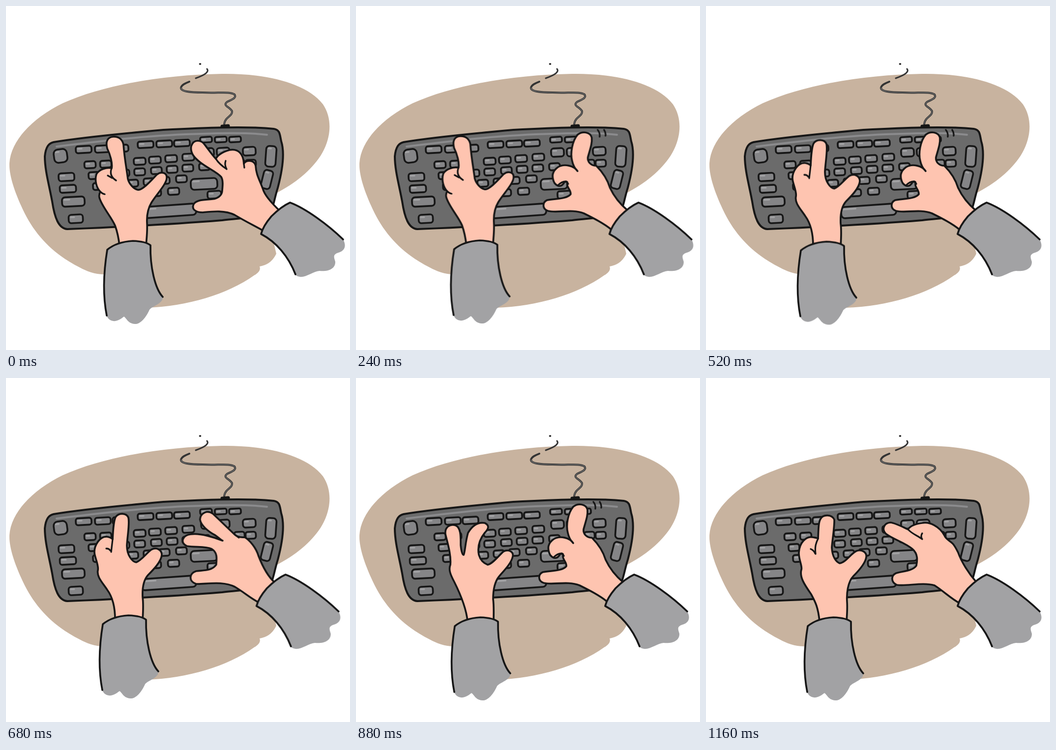
Animation, 700 px wide and 700 px high, one loop 1200 ms. Source, as an HTML page:

```html
<!DOCTYPE html>
<html lang="en">
<head>
<meta charset="utf-8">
<title>Typing hands</title>
<style>
html, body { margin: 0; width: 100%; height: 100%; overflow: hidden; background: #fff; }
svg { display: block; width: 100%; height: 100%; }

.line, .hand path { stroke: #161616; stroke-width: 3.7; stroke-linecap: round; stroke-linejoin: round; }
.line { fill: none; }
.hand path { fill: #fec4b0; }
.hand .crease { fill: none; stroke-width: 3.3; }
.sleeve { fill: #a2a2a4; }
.key { fill: #858587; stroke: #161616; stroke-width: 3.6; }
.shine { fill: none; stroke: #a3a3a5; stroke-width: 3.5; stroke-linecap: round; }

/* arms drift in 40 ms steps */
.arm { animation: 1200ms infinite; }
#left { animation-name: drift-left; }
#right { animation-name: drift-right; }
@keyframes drift-left {
  0% { transform: translate(0, 0); animation-timing-function: steps(4); }
  13.333% { transform: translate(-4px, -1px); animation-timing-function: steps(5); }
  30% { transform: translate(-10px, -1px); animation-timing-function: steps(4); }
  43.333% { transform: translate(-13px, 1.5px); animation-timing-function: steps(4); }
  56.666% { transform: translate(-9px, 5px); animation-timing-function: steps(5); }
  73.333% { transform: translate(-5px, 9px); animation-timing-function: steps(6); }
  93.333% { transform: translate(0, 11px); animation-timing-function: steps(1); }
  96.666%, 100% { transform: translate(1px, 9px); }
}
@keyframes drift-right {
  0% { transform: translate(0, 0); animation-timing-function: steps(22); }
  73.333% { transform: translate(-12px, 0); animation-timing-function: steps(6); }
  93.333% { transform: translate(-9px, 0); animation-timing-function: steps(1); }
  96.666%, 100% { transform: translate(-7px, 0); }
}

/* finger poses swap at once */
.hand { visibility: hidden; animation: 1200ms step-end infinite; }
#l-point { animation-name: l-point; }
#l-lift { animation-name: l-lift; }
#l-spread { animation-name: l-spread; }
#l-reach { animation-name: last; }
#r-point { animation-name: r-point; }
#r-lift { animation-name: r-lift; }
#r-spread { animation-name: r-spread; }
#r-reach { animation-name: last; }
@keyframes l-point { 0%, 90% { visibility: visible; } 23.333%, 96.666%, 100% { visibility: hidden; } }
@keyframes l-lift { 0%, 66.666%, 100% { visibility: hidden; } 23.333% { visibility: visible; } }
@keyframes l-spread { 0%, 90%, 100% { visibility: hidden; } 66.666% { visibility: visible; } }
@keyframes r-point { 0%, 90% { visibility: visible; } 10%, 96.666%, 100% { visibility: hidden; } }
@keyframes r-lift { 0%, 50%, 90%, 100% { visibility: hidden; } 10%, 66.666% { visibility: visible; } }
@keyframes r-spread { 0%, 66.666%, 100% { visibility: hidden; } 50% { visibility: visible; } }
@keyframes last { 0% { visibility: hidden; } 96.666%, 100% { visibility: visible; } }
</style>
</head>
<body>
<svg viewBox="0 0 700 700">
  <path fill="#c8b39f" d="M440 138C525 137 610 155 645 200C665 230 662 270 640 305C620 335 590 360 548 382L535 440L550 504Q540 526 516 530Q520 540 505 548C450 587 370 611 285 614L250 600L200 546C180 546 165 540 150 532C92 503 54 460 31 407C18 378 6 345 7 320C10 270 60 225 115 198C200 160 320 140 440 138Z"/>

  <g id="cable" fill="none" stroke-linecap="round">
    <path stroke="#333" stroke-width="4" d="M444 240C446 225 461 225 460 214C455 205 440 203 450 195C460 190 470 187 465 180C455 173 430 178 400 176C375 176 355 174 356 166C358 160 365 157 373 154"/>
    <path stroke="#777" stroke-width="1.2" d="M444 240C446 225 461 225 460 214C455 205 440 203 450 195C460 190 470 187 465 180C455 173 430 178 400 176C375 176 355 174 356 166"/>
    <path stroke="#333" stroke-width="3" d="M386 147C400 142 415 135 409 128"/>
    <path stroke="#222" stroke-width="3.6" d="M394.5 118h1"/>
    <path stroke="#161616" stroke-width="7" d="M440 245l12-1"/>
  </g>

  <path fill="#6b6b6b" stroke="#161616" stroke-width="4" d="M97 277C150 268 220 261 320 252C400 248 490 244 545 250C558 252 557 262 560 275C568 300 561 340 553 370C545 395 545 410 535 424C500 432 470 432 440 436C340 444 200 451 125 454C107 453 99 431 94 398C88 365 79 335 79 306C81 285 88 279 97 277Z"/>
  <path fill="none" stroke="#8b8b8d" stroke-width="4" stroke-linecap="round" d="M103 286C200 274 300 262 400 260C450 258 500 258 531 262"/>
  <g id="keys"></g>

  <g id="left" class="arm">
    <g id="l-point" class="hand">
      <path d="M231 488C229 470 226 458 222 447C215 430 195 408 190 390C189 385 190 381 192 378C184 370 180 355 184 342C190 332 205 328 215 330C217 320 212 302 206 290C202 275 207 267 218 266C230 265 237 272 239 282C241 310 246 335 248 352C251 363 260 372 268 374C278 376 300 350 307 343C316 336 328 339 327 350C327 362 305 385 296 400C290 410 286 425 287 442C288 460 286 472 285 488"/>
      <path class="crease" d="M215 330C211 340 213 348 224 355M207 345L216 350M192 378Q196 382 201 383"/>
    </g>
    <g id="l-lift" class="hand">
      <g transform="translate(10 1)">
        <path d="M221 486C221 460 216 440 205 425C195 410 183 398 186 385C188 375 180 360 179 350C178 335 190 315 205 317C211 318 214 320 216 322C217 300 218 285 222 277C228 268 244 268 248 278C251 290 246 315 245 335C245 355 256 368 264 369C275 365 285 350 295 343C305 338 316 343 316 354C315 368 298 385 288 395C279 405 276 420 277 440C279 455 278 470 277 486"/>
        <path class="crease" d="M216 322L213 348M203 341Q209 341 211 345"/>
      </g>
    </g>
    <g id="l-spread" class="hand">
      <path transform="translate(5 -9)" d="M227 495C224 465 210 435 200 415C192 400 188 390 192 380C194 360 186 335 182 318C180 303 192 296 203 300C214 305 213 325 213 340C214 350 216 360 219 360C222 355 222 335 228 315C238 298 250 293 262 295C273 300 269 308 262 315C250 330 247 345 250 360C253 370 260 377 268 380C278 378 290 362 300 353C310 348 321 353 319 363C316 378 300 393 291 404C282 415 279 430 279 450C281 465 280 480 280 495"/>
    </g>
    <g id="l-reach" class="hand">
      <g transform="translate(-1 -9)">
        <path d="M231 495C228 465 222 455 214 440C200 420 190 405 194 390C197 385 188 368 189 355C190 335 204 321 217 324C222 325 226 325 228 327C229 305 229 293 233 287C238 277 256 277 261 288C262 300 257 330 256 345C257 365 265 374 272 377C285 375 295 357 306 352C316 348 328 354 326 365C324 378 308 395 300 403C288 415 286 440 287 455C288 470 287 480 286 495"/>
        <path class="crease" d="M228 327C224 335 221 343 223 358M213 348Q219 350 222 357"/>
      </g>
    </g>
    <path class="sleeve" d="M206 496Q225 480 258 478Q285 479 294 487C293 530 303 575 319 592C320 606 298 610 292 618C282 640 270 648 262 647C248 646 246 636 240 632C230 640 222 643 214 640Q207 637 205 630C197 590 198 545 206 496Z"/>
    <path class="line" d="M205 630C197 590 198 545 206 496Q225 480 258 478Q285 479 294 487C293 530 303 575 319 592"/>
  </g>

  <g id="right" class="arm">
    <g id="r-point" class="hand">
      <path d="M556 416C545 405 530 390 524 376C517 355 509 345 508 325C505 312 488 313 484 321C483 300 472 290 455 293C440 297 430 304 427 311C418 301 412 292 405 283C398 272 382 270 377 285C374 300 385 310 395 318C410 330 430 338 438 348C442 355 441 365 440 375C440 386 430 392 420 393C405 394 388 394 382 403C377 413 385 420 400 420C420 418 445 415 465 425C485 437 505 447 523 457"/>
      <path class="crease" d="M427 311Q434 322 449 332M449 332Q444 323 447 315M484 321L485 329"/>
    </g>
    <g id="r-lift" class="hand">
      <g transform="translate(2 0)">
        <path d="M554 416C535 400 525 385 518 370C512 350 500 335 490 325C480 325 472 318 473 308C478 290 482 280 481 268C478 256 462 254 452 262C441 275 437 300 441 315C443 325 448 332 452 336C445 325 425 320 412 328C398 338 400 350 405 360C412 369 420 368 425 359C429 355 433 358 431 363C431 370 439 375 438 383C430 393 405 392 390 395C380 400 380 413 392 417C410 422 440 412 465 422C485 432 505 442 521 455"/>
        <path class="crease" d="M412 365Q420 357 428 357L433 362M493 252Q498 258 497 266M506 252Q510 258 509 264"/>
      </g>
    </g>
    <g id="r-spread" class="hand">
      <g transform="translate(10 0)">
        <path d="M546 416C530 402 520 380 513 362C508 345 495 330 485 324C475 325 468 322 464 318C450 305 435 290 420 276C408 268 395 275 394 288C396 300 410 312 425 320C432 325 437 330 440 331C425 325 395 315 375 318C358 320 353 335 367 342C385 345 405 342 418 348C430 355 428 368 427 380C418 393 400 391 386 393C371 398 371 414 386 419C405 420 440 412 465 425C485 437 495 447 514 457"/>
        <path class="crease" d="M464 318L473 325"/>
      </g>
    </g>
    <g id="r-reach" class="hand">
      <g transform="translate(7 0)">
        <path d="M549 414C535 398 520 375 513 355C508 345 505 340 502 337C495 330 488 328 485 320C475 302 455 292 440 295C425 297 415 302 411 308C398 302 385 295 375 294C362 295 357 308 366 317C380 328 405 335 420 348C432 358 430 372 428 382C420 393 400 393 387 397C376 402 376 415 388 421C410 424 440 415 465 422C485 435 500 450 516 458"/>
        <path class="crease" d="M411 308C420 318 430 320 440 328M440 328Q436 322 440 316"/>
      </g>
    </g>
    <path class="sleeve" d="M519 464Q523 448 540 428Q560 408 578 400C610 412 655 445 686 475C693 488 690 498 676 502C664 506 668 512 670 520C671 535 655 541 638 539C625 540 610 553 598 551Q590 550 589 546C575 510 550 480 519 464Z"/>
    <path class="line" d="M686 475C655 445 610 412 578 400Q560 408 540 428Q523 448 519 464C550 480 575 510 589 546"/>
  </g>
</svg>
<script>
const keys = document.getElementById('keys');

function add(tag, attrs) {
  const el = document.createElementNS('http://www.w3.org/2000/svg', tag);
  for (const k in attrs) el.setAttribute(k, attrs[k]);
  keys.append(el);
}

function key(x, y, w, h, turn = -3) {
  const transform = `translate(${x} ${y}) rotate(${turn})`;
  add('rect', { class: 'key', transform, x: -w / 2, y: -h / 2, width: w, height: h, rx: Math.min(w, h) * 0.32 });
  add('path', { class: 'shine', transform, d: `M${5 - w / 2} ${5 - h / 2}h${w * 0.22}` });
}

// keys of one size along a sloping line
function row(y, slope, w, h, ...xs) {
  for (const x of xs) key(x, y + slope * (x - xs[0]), w, h);
}

row(292, -0.03, 32, 14, 158, 197, 233);
row(282, -0.04, 32, 13, 284, 322, 358);
row(272, -0.01, 24, 11, 407, 437, 466);
row(323, -0.04, 23, 14, 171, 203);
row(316, -0.085, 24, 14, 272, 303, 336, 371);
row(298, -0.03, 26, 17, 410, 442, 495);
row(345, -0.08, 22, 14, 179, 240, 272, 306, 338, 370, 404);
row(320, 0, 21, 14, 475, 498);
row(367, -0.09, 22, 14, 188, 258, 291, 322, 357);
row(380, -0.08, 23, 14, 304, 341);
key(403, 362, 54, 22);
key(424, 384, 28, 15);
key(111, 305, 27, 27, -8);
key(123, 348, 32, 16);
key(126, 372, 33, 15);
key(137, 398, 46, 19);
key(142, 433, 29, 17);
key(539, 306, 21, 42, 4);
key(531, 353, 19, 38, 14);
key(331, 417, 112, 23, -4);
</script>
</body>
</html>
```
